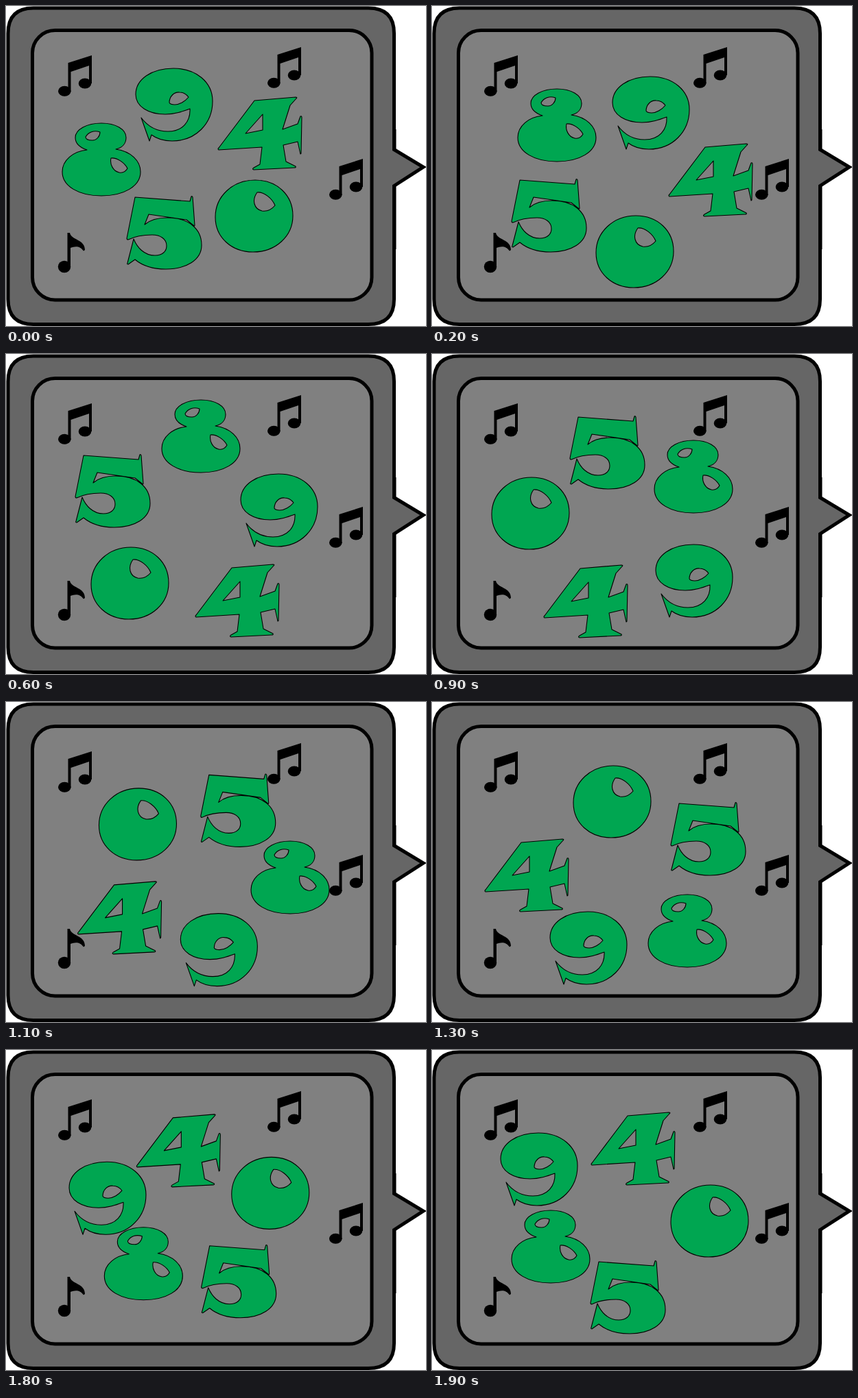
Write an HTML page that moves like this. It is 612 px wide and 467 px high and loops after 2000 ms.

```html
<!DOCTYPE html>
<html lang="en">
<head>
<meta charset="utf-8">
<title>Circling digits</title>
<style>
  html, body { margin: 0; width: 100%; height: 100%; overflow: hidden; background: #fff; }
  svg { display: block; }
</style>
</head>
<body>
<svg width="612" height="467" viewBox="0 0 612 467">
  <defs>
    <g id="pair">
      <ellipse cx="9.3" cy="52.3" rx="9.3" ry="7.5"/>
      <ellipse cx="39" cy="41" rx="9.3" ry="7.5"/>
      <path d="M14.5 11L49 0V41H45V15L18.5 24V53H14.5Z"/>
    </g>
  </defs>
  <path d="M40 3H528Q565.500 3 565.500 40V209.500L608 235L565.500 262.500V428Q565.500 464.500 528 464.500H40Q3 464.500 3 428V40Q3 3 40 3Z"
    fill="#666" stroke="#000" stroke-width="5"/>
  <path d="M567.500 180V209M567.500 262V355" stroke="#000" stroke-width="2"/>
  <rect x="38.500" y="35.500" width="494.500" height="393.500" rx="33" fill="#808080" stroke="#000" stroke-width="5"/>
  <g id="digits" fill="#00a651" fill-rule="evenodd" stroke="#000" stroke-width="1.1" stroke-linejoin="round"></g>
  <use href="#pair" x="76" y="72"/>
  <use href="#pair" x="381" y="60"/>
  <use href="#pair" x="471" y="223"/>
  <ellipse cx="85" cy="380.500" rx="9.2" ry="8.700"/>
  <path d="M89.500 331H93C95 342 115 340 115 356L113 357.500C108 350 101 350 94 353V381H89.500Z"/>
</svg>
<script>
const LOOP = 2000, STEP = 100;
const TIMES = [0, 200, 600, 900, 1300, 1600, 1900];

// Outlines and knots are relative to each digit's top-left corner.
const DIGITS = [
  { d: `M112 48C112 20 88 0 55 0C23 0 0 16 0 38C0 56 19 67 43 67C57 67 68 63 79 59
        C80 78 68 92 47 92C29 92 17 84 8 72L20 106L23 97C31 103 41 106 53 106C88 106 112 80 112 48Z
        M49 50C49 41 56 34 64 35C70 35 74 38 77 42C72 48 64 53 57 53C53 53 50 52 49 50Z`,
    x: [189, 263, 342, 326, 172, 100, 100],
    y: [91, 103, 175, 278, 306, 234, 121] },
  { d: `M54 5L114 0Q117 0 115 2L106 12L95 47L117 39L121 28Q123 27 123 30L122 82L121 83L117 65L96 70
        L100 94L114 101Q115 103 112 103L53 106Q50 105 53 103L62 98L65 73L2 77Q0 76 2 74Z
        M41 53L66 25V48Z`,
    x: [308, 344, 275, 162, 76, 125, 231],
    y: [133, 201, 307, 308, 200, 118, 91] },
  { d: `M36 39C27 36 19 30 19 21C19 9 36 0 57 0C78 0 93 9 93 21C93 30 87 36 78 38
        C100 41 114 55 114 71C114 92 90 106 57 106C24 106 0 92 0 71C0 54 16 41 36 39Z
        M34 20C38 13 46 10 55 13C55 19 50 25 44 25C38 25 34 23 34 20Z
        M71 51C80 50 91 58 95 66C92 71 88 73 83 72C74 70 69 60 71 51Z`,
    times: [0, 200, 600, 900, 1100, 1300, 1600, 1900],
    x: [82, 125, 227, 324, 357, 315, 205, 116],
    y: [171, 121, 67, 126, 203, 281, 288, 234] },
  { d: `M12 1L92 7L94 0Q95 -1 96 1L99 42Q99 44 97 42L87 34L32 26L26 41C34 34 45 31 59 31
        C90 31 109 47 109 71C109 93 86 106 57 106C39 106 24 102 12 92L2 99Q0 99 1 97L10 62
        C15 74 25 86 41 86C52 86 58 80 58 72C58 62 49 56 37 56C24 56 12 58 2 63Q0 63 0 61Z`,
    x: [176, 116, 101, 201, 348, 351, 231],
    y: [278, 253, 147, 91, 147, 234, 308] },
  { d: `M0 54C0 24 25 0 58 0C90 0 113 22 113 52C113 82 88 105 55 105C24 105 0 84 0 54Z
        M61 18C71 17 83 27 87 37C82 43 75 46 68 45C56 42 53 29 61 18Z`,
    x: [305, 239, 124, 87, 206, 285, 348],
    y: [254, 306, 282, 180, 93, 103, 197] }
];

const clamp = (v, lo, hi) => Math.min(hi, Math.max(lo, v));

// Open cubic Hermite curve with parabolic tangents.
function spline(t, p) {
  const last = t.length - 1;
  const slope = t.slice(1).map((b, i) => (p[i + 1] - p[i]) / (b - t[i]));
  const m = t.map((_, i) => {
    if (i === 0 || i === last) return 0;
    const before = t[i] - t[i - 1], after = t[i + 1] - t[i];
    return (slope[i - 1] * after + slope[i] * before) / (before + after);
  });
  m[0] = 2 * slope[0] - m[1];
  m[last] = 2 * slope[last - 1] - m[last - 1];
  return time => {
    let i = 0;
    while (i < last - 1 && time >= t[i + 1]) i++;
    const h = t[i + 1] - t[i], s = (time - t[i]) / h, r = 1 - s;
    return r * r * (1 + 2 * s) * p[i] + s * s * (3 - 2 * s) * p[i + 1]
      + h * s * r * (r * m[i] - s * m[i + 1]);
  };
}

const layer = document.getElementById("digits");
const movers = DIGITS.map(({ d, x, y, times = TIMES }) => {
  const path = document.createElementNS("http://www.w3.org/2000/svg", "path");
  path.setAttribute("d", d);
  layer.append(path);
  const px = spline(times, x), py = spline(times, y);
  const right = Math.max(...x) + 3, top = Math.min(...y) - 1;
  return time => path.setAttribute("transform",
    `translate(${clamp(px(time), 76, right)} ${clamp(py(time), top, 309)})`);
});

const start = performance.now();
function draw(now) {
  const elapsed = Math.max(0, now - start) % LOOP;
  const time = Math.floor(elapsed / STEP) * STEP;
  movers.forEach(move => move(time));
  requestAnimationFrame(draw);
}
draw(start);
</script>
</body>
</html>
```
